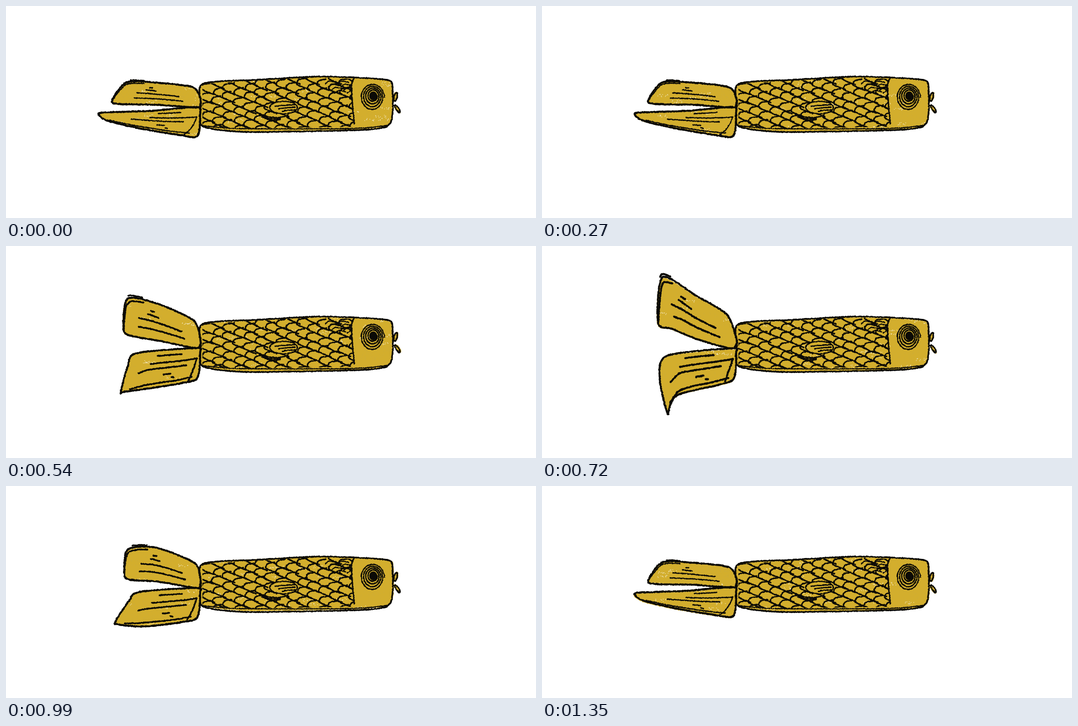
Write an HTML page with a canvas that moves like this. It is 1182x474 px and loops after 1.44 s.

```html
<!DOCTYPE html>
<html lang="en">
<head>
<meta charset="utf-8">
<title>Carp streamer</title>
<style>
html, body { margin: 0; width: 100%; height: 100%; overflow: hidden; background: #fff; }
canvas { display: block; width: 1182px; height: 474px; }
</style>
</head>
<body>
<canvas id="stage" width="1182" height="474"></canvas>
<script>
const W = 1182, H = 474, STEP = 90, COUNT = 16;
const GOLD = '#d3ae2d', INK = '#0b0a06';

let seed = 1;
function rnd() {
  seed = (seed + 0x6D2B79F5) | 0;
  let t = Math.imul(seed ^ (seed >>> 15), 1 | seed);
  t = (t + Math.imul(t ^ (t >>> 7), 61 | t)) ^ t;
  return ((t ^ (t >>> 14)) >>> 0) / 4294967296;
}
const jit = a => (rnd() * 2 - 1) * a;
const mix = (a, b, t) => a.map((v, i) => v + (b[i] - v) * t);

function pts(s) {
  return s.split(' ').map(p => p.split(',').map(Number));
}

// smooth curve through the points, sampled about once a pixel
function curve(p, closed) {
  const n = p.length, out = [], soft = 0.4;
  const at = i => closed ? p[(i + n) % n] : p[Math.max(0, Math.min(n - 1, i))];
  for (let i = 0; i < (closed ? n : n - 1); i++) {
    const a = at(i - 1), b = at(i), c = at(i + 1), d = at(i + 2);
    const k = Math.max(2, Math.ceil(Math.hypot(c[0] - b[0], c[1] - b[1])));
    for (let j = 0; j < k; j++) {
      const t = j / k, s = 1 - t;
      out.push(b.map((v, q) => s * s * (1 + 2 * t) * v + t * t * (3 - 2 * t) * c[q] +
        soft * (t * s * s * (c[q] - a[q]) - t * t * s * (d[q] - v))));
    }
  }
  if (!closed) out.push(p[n - 1]);
  return out;
}

function oval(cx, cy, rx, ry, tilt = 0) {
  const c = Math.cos(tilt), s = Math.sin(tilt);
  return Array.from({ length: 12 }, (_, i) => {
    const x = rx * Math.cos(i * Math.PI / 6), y = ry * Math.sin(i * Math.PI / 6);
    return [cx + x * c - y * s, cy + x * s + y * c];
  });
}

function crayon(g, line, w, color = INK) {
  g.beginPath();
  for (const [x, y] of line) {
    const r = w / 2 * (0.75 + rnd() * 0.5);
    const cx = x + jit(0.7), cy = y + jit(0.7);
    g.moveTo(cx + r, cy);
    g.arc(cx, cy, r, 0, 7);
  }
  g.fillStyle = color;
  g.fill();
}
const draw = (g, p, w, closed) => crayon(g, curve(p, closed), w);

function trace(g, line) {
  line.forEach(([x, y], i) => i ? g.lineTo(x, y) : g.moveTo(x, y));
  g.closePath();
}

// gold area, a little off its outline, with grain and bare streaks of paper
function paint(g, shape, specks) {
  const raw = curve(shape, true);
  const range = q => [Math.min(...raw.map(p => p[q])), Math.max(...raw.map(p => p[q]))];
  const [x0, x1] = range(0), [y0, y1] = range(1);
  const dx = jit(1.5), dy = jit(2), my = (y0 + y1) / 2;
  const line = raw.map(([x, y]) => [x + dx, my + (y - my) * 0.975 + dy]);
  const spot = () => [x0 + rnd() * (x1 - x0), y0 + rnd() * (y1 - y0)];
  g.beginPath();
  trace(g, line);
  g.fillStyle = GOLD;
  g.fill();
  crayon(g, line, 2, GOLD);
  g.save();
  g.beginPath();
  trace(g, line);
  g.clip();
  g.fillStyle = 'rgba(190,168,90,.6)';
  for (let i = 0; i < (x1 - x0) * 2; i++) g.fillRect(...spot(), 1, 1);
  g.fillStyle = '#fdfaf0';
  for (let i = 0; i < specks; i++) {
    const [cx, cy] = spot();
    for (let j = 0; j < 10; j++) g.fillRect(cx + jit(12), cy + jit(3), 1.3, 1.2);
  }
  g.restore();
}

const body = pts('438,268 435,220 440,174 560,165 692,158 780,160 852,166 862,185 858,260 810,276 620,281 520,281');
const hem = pts('440,268 520,274 770,274 852,267');
const gill = pts('775,163 770,185 777,264');
const patch = oval(619, 227, 31, 14);
const mouth = [oval(869, 203, 3.5, 10, 0.2), oval(873, 230, 3, 10, -0.6)];

// Each lobe has two edges from tip to root, given closed, half open and wide open.
// Folds run across it as [u0, v0, u1, v1]: u from tip to root, v from top to bottom edge.
const upper = {
  top: ['237,211 268,171 330,171 415,181 433,205', '264,194 272,142 335,138 420,172 433,205',
    '259,172 269,70 345,112 412,153 433,205'].map(pts),
  low: ['237,211 252,219 340,221 424,227', '264,194 274,209 340,214 424,228',
    '259,172 290,185 345,208 420,229'].map(pts),
  root: [433, 220],
  folds: [[.33, .5, .75, .55], [.3, .72, .8, .75], [.45, .25, .48, .25], [.42, .35, .52, .38],
    [.02, .1, .4, .08], [.28, -.06, .4, -.04]]
};
const lower = {
  top: ['207,240 250,237 330,234 424,226', '244,303 275,256 297,237 424,228',
    '280,375 263,300 278,246 424,229'].map(pts),
  low: ['207,240 225,256 295,273 390,289 427,290', '244,303 252,310 310,314 395,304 427,293',
    '280,375 285,358 305,332 395,310 428,296'].map(pts),
  root: [433, 240],
  folds: [[.62, .15, .82, .15], [.53, .35, 1, .35], [.35, .5, .85, .5], [.6, .68, .67, .68],
    [.67, .78, .69, .8], [.15, .88, .9, .9], [1, .35, .86, .97]]
};

function pose(lobe, k) {
  const i = Math.min(1, Math.floor(k));
  const edge = sets => sets[i].map((p, n) => mix(p, sets[i + 1][n], k - i));
  const top = edge(lobe.top), low = edge(lobe.low);
  const a = curve(top), b = curve(low);
  const along = (line, u) => line[Math.round(u * (line.length - 1))];
  const folds = lobe.folds.map(([u0, v0, u1, v1]) => [0, 1, 2, 3, 4].map(n => {
    const [u, v] = mix([u0, v0], [u1, v1], n / 4);
    return mix(along(a, u), along(b, u), v);
  }));
  return { shape: [...top, lobe.root, ...low.slice(1).reverse()], folds };
}

function layer() {
  const c = document.createElement('canvas');
  c.width = W;
  c.height = H;
  return [c, c.getContext('2d')];
}

function drawScales(g) {
  g.save();
  g.beginPath();
  trace(g, pts('438,174 692,159 772,163 776,270 520,274 438,268'));
  trace(g, curve(patch, true));
  g.clip('evenodd');
  for (let c = 0; c < 15; c++) {
    for (let r = 0; r < 6; r++) {
      const x = 437 + c * 23.5 + jit(3), y = 162 + r * 21 + (c % 2) * 10.5 + jit(2.5);
      draw(g, [[x + 20, y - 11], [x + 5, y - 8], [x, y + 1], [x + 10, y + 7], [x + 28, y + 14]], 3);
    }
  }
  for (let i = 0; i < 8; i++) {
    const x = 712 + i * 7, y = 168 + (i % 4) * 7;
    draw(g, [[x, y + 6], [x + 9, y], [x + 24, y + 3]], 2.4);
  }
  g.restore();
  draw(g, patch, 2.6, true);
  for (let i = 0; i < 3; i++) {
    draw(g, [[600 + i * 8, 224 + i * 6], [622, 222 + i * 6], [645, 220 + i * 6]], 2.6);
    draw(g, [[560 + i * 5, 238 + i * 5], [580 + i * 5, 247 + i * 4], [612, 250 + i * 2]], 2.6);
  }
}

function drawEye(g) {
  const end = 4 * 2 * Math.PI, line = [];
  for (let a = 0; a < end; a += 0.04) {
    const k = a / end, r = 9 + 18 * k;
    line.push([819 - 2 * k + r * Math.cos(a), 201 + 4 * k + r * 1.13 * Math.sin(a)]);
  }
  crayon(g, line, 2.6);
  g.beginPath();
  g.ellipse(819, 201, 9, 10, 0, 0, 7);
  g.fill();
}

seed = 42;
const [bodyInk, ink] = layer();
drawScales(ink);
draw(ink, body, 3.4, true);
draw(ink, hem, 2.4);
draw(ink, gill, 3);
mouth.forEach(p => draw(ink, p, 3, true));
drawEye(ink);

// the tail rests, snaps half open, then spreads more slowly
const spread = n => Math.max(0, Math.min((n - 3) / 2, 1 + (n - 5) / 3));

function cel(n) {
  const [c, g] = layer(), k = spread(n);
  const lobes = [upper, lower].map(lobe => pose(lobe, k));
  seed = 100 + n * 977;
  g.fillStyle = '#fff';
  g.fillRect(0, 0, W, H);
  paint(g, body, 24);
  mouth.forEach(p => paint(g, p, 0));
  lobes.forEach(l => paint(g, l.shape, 7));
  g.drawImage(bodyInk, 0, 0);
  for (const l of lobes) {
    draw(g, l.shape, 4, true);
    l.folds.forEach(f => draw(g, f, 2.6 + k * 0.7));
  }
  return c;
}
const cels = Array.from({ length: COUNT / 2 + 1 }, (_, n) => cel(n));

const stage = document.getElementById('stage').getContext('2d');
function show(now) {
  const i = Math.floor(now / STEP) % COUNT;
  stage.drawImage(cels[Math.min(i, COUNT - i)], 0, 0);
  requestAnimationFrame(show);
}
show(0);
</script>
</body>
</html>
```
